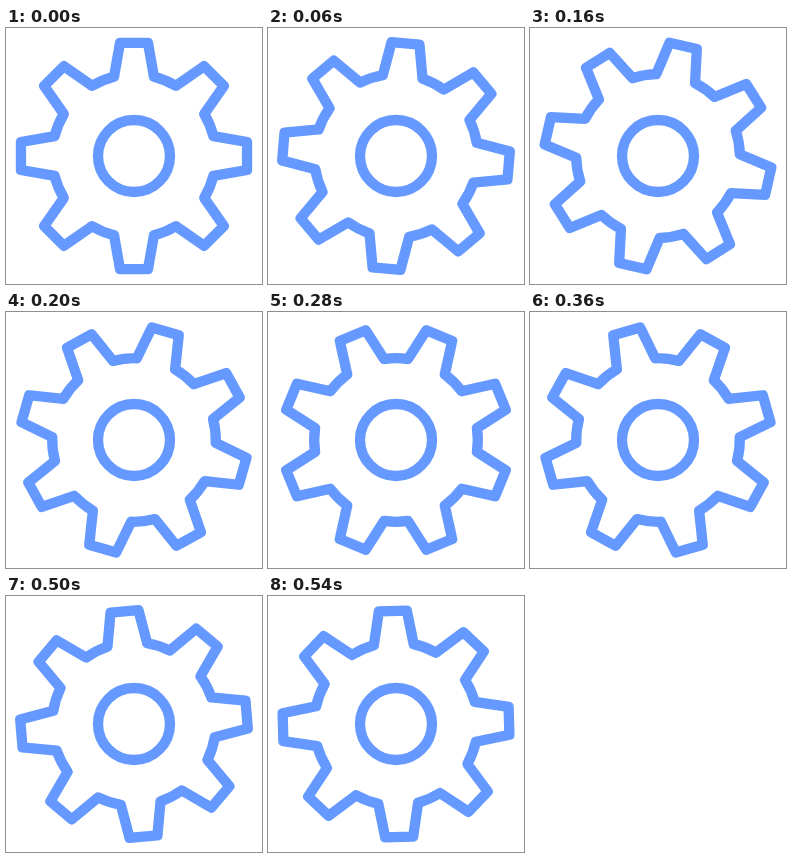
Write an HTML page that moves like this. It is 256 by 256 pixels and loops after 560 ms.

```html
<!DOCTYPE html>
<html lang="en">
<head>
<meta charset="utf-8">
<title>Turning gear</title>
<style>
  html, body { margin: 0; width: 100%; height: 100%; overflow: hidden; background: #fff; }
  svg { display: block; width: 100vw; height: 100vh; }
</style>
</head>
<body>
<svg viewBox="-128 -128 256 256" fill="none" stroke="#69f" stroke-width="10.3" stroke-linejoin="round">
  <path id="gear"/>
  <circle r="36"/>
</svg>
<script>
  const TEETH = 8, PITCH = 360 / TEETH;
  const LOOP = 560, STEP = 20;
  const TIP = { radius: 113.9, angle: 7.06 };
  const ROOT = { radius: 81.8, angle: 14.1 };
  const gear = document.getElementById('gear');

  // Angles are clockwise from straight up.
  function point(radius, degrees) {
    const a = degrees * Math.PI / 180;
    return `${(radius * Math.sin(a)).toFixed(2)} ${(-radius * Math.cos(a)).toFixed(2)}`;
  }

  function tooth(center) {
    const valley = `A${ROOT.radius} ${ROOT.radius} 0 0 1 `;
    return 'L' + point(TIP.radius, center - TIP.angle) +
      'L' + point(TIP.radius, center + TIP.angle) +
      'L' + point(ROOT.radius, center + ROOT.angle) +
      valley + point(ROOT.radius, center + PITCH - ROOT.angle);
  }

  let outline = 'M' + point(ROOT.radius, -ROOT.angle);
  for (let i = 0; i < TEETH; i++) outline += tooth(i * PITCH);
  gear.setAttribute('d', outline + 'Z');

  function draw() {
    const time = Math.floor(performance.now() % LOOP / STEP) * STEP;
    gear.setAttribute('transform', `rotate(${time / LOOP * PITCH})`);
    requestAnimationFrame(draw);
  }
  draw();
</script>
</body>
</html>
```
